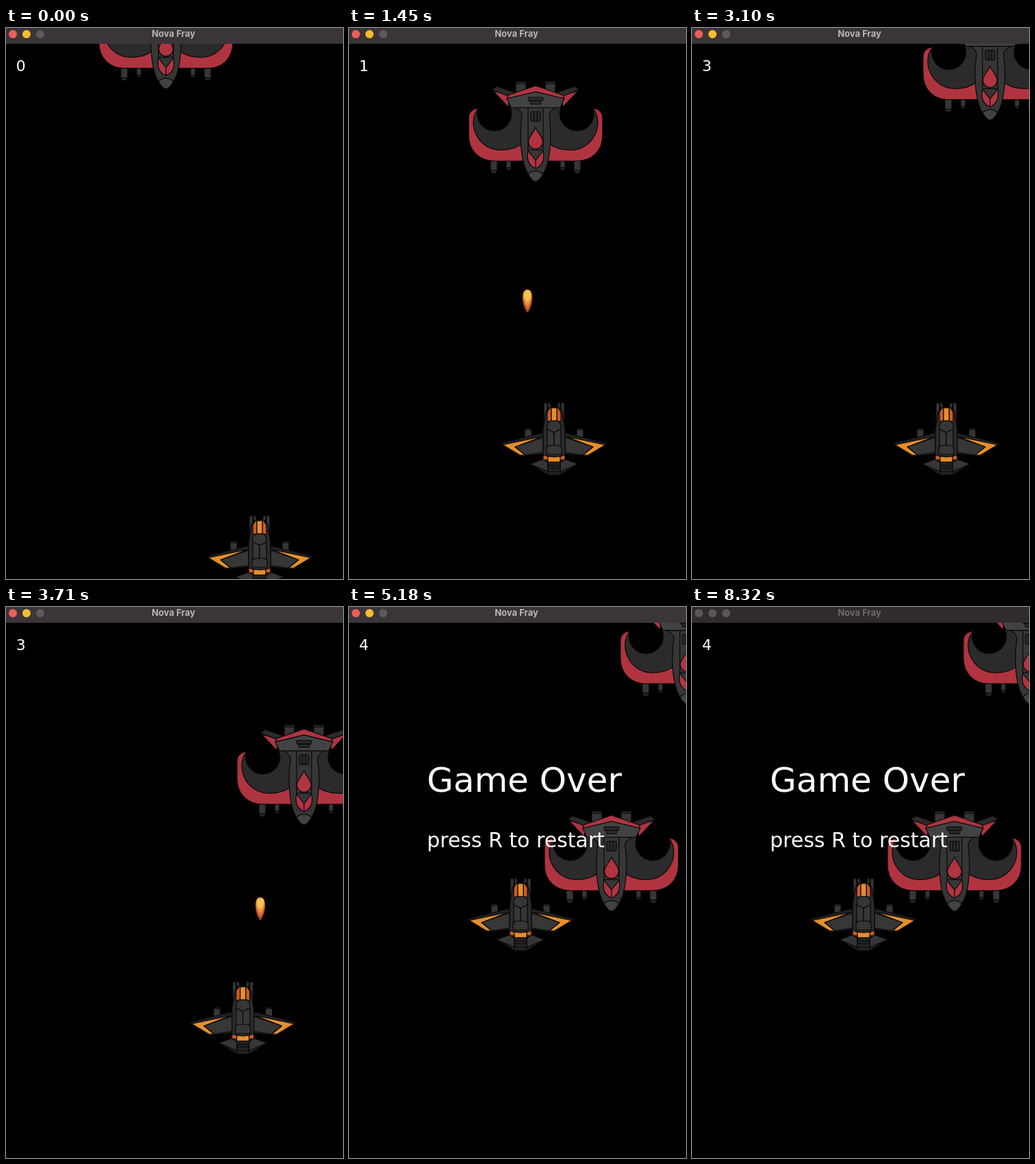
Write an HTML page with a canvas that moves like this. It is 493 by 805 pixels and loops after 8.42 s.

```html
<!DOCTYPE html>
<html lang="en">
<head>
<meta charset="utf-8">
<title>Nova Fray</title>
<style>
  html, body { margin: 0; width: 100%; height: 100%; overflow: hidden; background: #000; }
  canvas { display: block; width: 493px; height: 805px; }
</style>
</head>
<body>
<canvas id="stage" width="493" height="805"></canvas>
<script>
const ctx = document.getElementById('stage').getContext('2d');
const LOOP = 8420, GAME_OVER = 5137, SPEED = 0.301, SHOT_SPEED = 0.6;

// The picture refreshes every 210 ms, with a few shorter gaps.
const ticks = [0];
for (let i = 0; i < 25; i++) {
  ticks.push(ticks[i] + ([2, 5, 8, 10, 13, 15, 17].includes(i) ? 200 : 210));
}

// Parts: colour, path, and whether the path is repeated on the other side.
const part = (color, path, mirrored = false) => ({ color, path: new Path2D(path), mirrored });
const RED = '#b03440', COAL = '#2b2b2b', GREY = '#363636', STEEL = '#424242';
const ORANGE = '#e58f2c', RUST = '#cc5a28', DARK = '#222';

const enemyParts = [
  part(GREY, 'M-29 0h15v20h-15z', true),
  part(COAL, 'M-29 0h15v3h-15z', true),
  part(GREY, 'M-66 115h10v15h-10z', true),
  part(COAL, 'M-66 130h10l-2 4h-6z', true),
  part(GREY, 'M-43 115h7v11h-7z', true),
  part(COAL, 'M-43 126h7l-1 3h-5z', true),
  part(RED, 'M-84 39Q-98 41 -98 54V78C-98 102 -82 116 -60 116H0V38H-37A25 25 0 1 1 -84 39z', true),
  part(COAL, 'M-84 39C-102 62 -84 101 -50 100C-35 100 -25 95 -19 90L0 38H-37A25 25 0 1 1 -84 39z', true),
  part(RED, 'M-62 14L-37 20L-40 37z', true),
  part(COAL, 'M-64 12L-57 7L-28 17L-38 22z', true),
  part(GREY, 'M-30 38Q-18 44 -20 52C-24 78 -22 118 -11 135Q-5 146 0 146Q5 146 11 135C22 118 24 78 20 52Q18 44 30 38z'),
  part(GREY, 'M-11 38H11V100H-11z'),
  part(STEEL, 'M-11 135Q0 126 11 135Q5 146 0 146Q-5 146 -11 135z'),
  part(RED, 'M-40 20L0 6L40 20L42 25L0 15L-42 25z'),
  part(STEEL, 'M-42 25L0 15L42 25L36 38H-36z'),
  part(COAL, 'M-10 23H10Q12 25 10 28H-10Q-12 25 -10 23z'),
  part(COAL, 'M-8 28H8L7 33H-7z'),
  part(COAL, 'M-6 44H6L7 46V56L6 58H-6L-7 56V46zM-2.3 44V58M2.3 44V58'),
  part(RED, 'M0 67C3 75 10.5 81 10.5 88A10.5 10.5 0 0 1 -10.5 88C-10.5 81 -3 75 0 67z'),
  part(RED, 'M-11 101L0 115L11 101Q15 120 0 127Q-15 120 -11 101zM0 115V127')
];

const shipParts = [
  part(GREY, 'M-43 39h10v14h-10z', true),
  part(COAL, 'M-42 38h8v2h-8z', true),
  part(GREY, 'M-15 2q2.5 -3 5 0v28h-5z', true),
  part(GREY, 'M-9 1l3 -1l2 8h-5z', true),
  part(DARK, 'M-78 60L-14 44V75L-50 79z', true),
  part(ORANGE, 'M-75 62L-18 50L-57 65L-42 77L-50 77z', true),
  part(GREY, 'M-57 65L-16 51V73L-42 77z', true),
  part(DARK, 'M-35 90L-16 83H0V106H-9z', true),
  part(GREY, 'M-35 90L-16 83L-9 88V101z', true),
  part(RUST, 'M-16 76L-7 80L-9 84L-16 84z', true),
  part(DARK, 'M-9 87H9V106H-9zM-9 92H9M-9 96H9M-9 101H9'),
  part(ORANGE, 'M-9 79H9V87H-9z'),
  part(COAL, 'M-16 40L-12 14L-6 7H6L12 14L16 40V77L0 80L-16 77z'),
  part(RUST, 'M-10 28V14L-6 8H-4V27z', true),
  part(ORANGE, 'M-4 8H4V27H-4z'),
  part(GREY, 'M-10 32L-6 27H6L10 32V39L0 44L-10 39z'),
  part(GREY, 'M-10 39L0 44V65H-10z', true),
  part(GREY, 'M-11 66L-8 63H8L11 66V75L8 76H-8L-11 75z')
];

const flame = new Path2D('M0 34C-9 24 -11 0 0 0C11 0 9 24 0 34z');
const flameLayers = [['#a4422a', 1], ['#d66c31', 0.86], ['#e69a3c', 0.68], ['#efc551', 0.5]];

// Enemies: centre x, time at which the top reaches y = 0, time of destruction.
const enemies = [
  [234, 190, 900], [273, 1190, 1620], [333, 2160, 2200],
  [436, 3138, 3820], [384, 4146, LOOP], [495, 5150, LOOP]
];

// Shots: time fired, time gone.
const shots = [[575, 900], [1150, 1620], [1580, 2200], [2022, 2950], [3505, 3820]];

// Ship route: time, x, y.
const route = [
  [0, 371, 712], [130, 371, 673], [497, 261, 563], [500, 261, 562], [1300, 261, 562],
  [1350, 276, 547], [1430, 300, 547], [1840, 300, 547], [2220, 186, 547], [2463, 186, 547],
  [3083, 372, 547], [3625, 372, 547], [4297, 171, 547], [4380, 171, 547],
  [4883, 171, 396], [GAME_OVER, 251, 396]
];

function shipAt(time) {
  const next = Math.max(1, route.findIndex(stop => stop[0] >= time));
  const [t0, x0, y0] = route[next - 1], [t1, x1, y1] = route[next];
  const p = (time - t0) / (t1 - t0);
  return { x: x0 + (x1 - x0) * p, y: y0 + (y1 - y0) * p };
}

function drawParts(parts, x, y) {
  ctx.strokeStyle = '#080808';
  ctx.lineWidth = 1.2;
  ctx.lineJoin = 'round';
  for (const { color, path, mirrored } of parts) {
    for (const side of mirrored ? [1, -1] : [1]) {
      ctx.save();
      ctx.translate(x, y);
      ctx.scale(side, 1);
      ctx.fillStyle = color;
      ctx.fill(path);
      ctx.stroke(path);
      ctx.restore();
    }
  }
}

function drawShot(x, y) {
  for (const [color, size] of flameLayers) {
    ctx.save();
    ctx.translate(x, y + (1 - size) * 2);
    ctx.scale(0.4 + size * 0.55, size);
    ctx.fillStyle = color;
    ctx.fill(flame);
    ctx.restore();
  }
}

function drawText(text, x, y, size) {
  ctx.font = `${size}px "DejaVu Sans", sans-serif`;
  ctx.textAlign = 'left';
  ctx.textBaseline = 'alphabetic';
  ctx.fillStyle = '#fff';
  ctx.fillText(text, x, y);
}

function drawTitleBar(active) {
  ctx.fillStyle = active ? '#3a3539' : '#302b2f';
  ctx.fillRect(0, 0, 493, 23);
  const lights = active ? ['#ec5f58', '#f6bc2f', '#5d595c'] : Array(3).fill('#5a5558');
  lights.forEach((color, i) => {
    ctx.fillStyle = color;
    ctx.beginPath();
    ctx.arc(10 + i * 20, 9, 6, 0, Math.PI * 2);
    ctx.fill();
  });
  ctx.font = 'bold 13px Inter, sans-serif';
  ctx.textAlign = 'center';
  ctx.textBaseline = 'alphabetic';
  ctx.fillStyle = active ? '#b9b4b8' : '#6d686b';
  ctx.fillText('Nova Fray', 245, 13);
}

const pointer = new Path2D('M478.5 790.5V804L481.8 801L484 805H487L485 800.5H489z');

function drawPointer() {
  ctx.fillStyle = '#000';
  ctx.strokeStyle = '#fff';
  ctx.lineWidth = 1;
  ctx.fill(pointer);
  ctx.stroke(pointer);
}

function draw(clock) {
  const tick = ticks.filter(t => t <= clock).pop();
  const time = Math.min(tick, GAME_OVER);
  const score = enemies.filter(enemy => enemy[2] <= time).length;

  ctx.fillStyle = '#000';
  ctx.fillRect(0, 0, 493, 805);

  for (const [fired, gone] of shots) {
    if (time < fired || time >= gone) continue;
    const { x, y } = shipAt(fired);
    drawShot(x, y - (time - fired) * SHOT_SPEED);
  }
  const ship = shipAt(time);
  drawParts(shipParts, ship.x, ship.y);
  for (const [x, start, gone] of enemies) {
    if (time < gone) drawParts(enemyParts, x, (time - start) * SPEED);
  }

  drawText(score, 14.7, 62.5, 22);
  if (tick >= GAME_OVER) {
    drawText('Game Over', 114, 270, 50);
    drawText('press R to restart', 114, 351, 30);
  }
  if (clock >= 7490 && clock < 7700) drawPointer();
  drawTitleBar(clock < 8320);
}

const begin = performance.now();
function frame() {
  draw((performance.now() - begin) % LOOP);
  requestAnimationFrame(frame);
}
frame();
</script>
</body>
</html>
```
